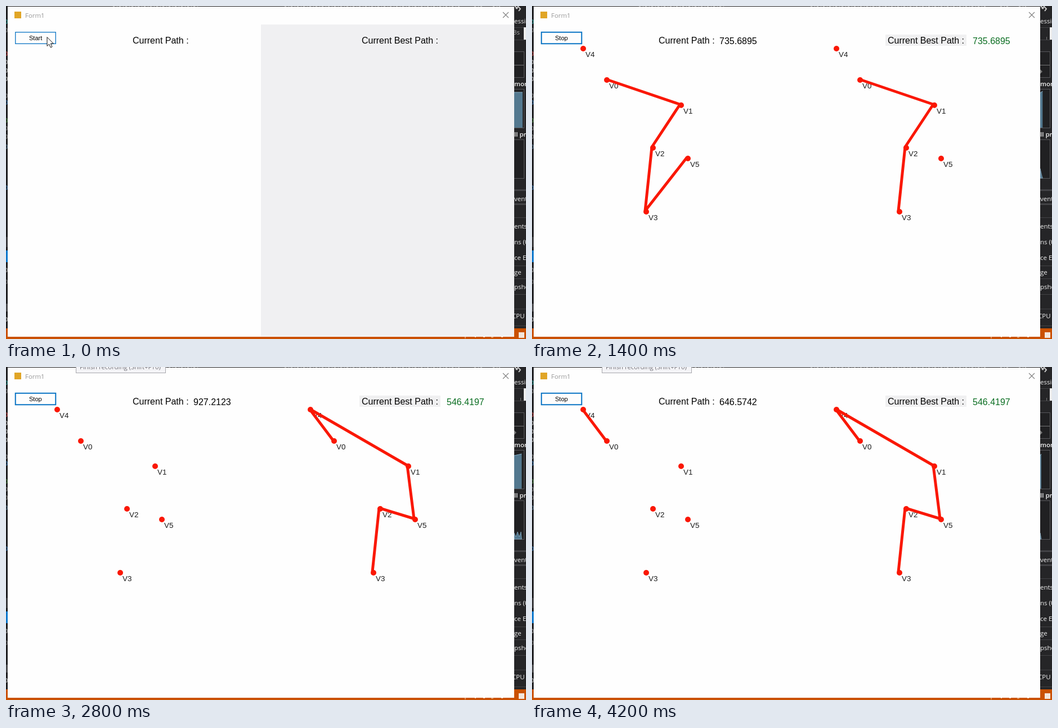
An HTML page that plays this animation: 924 by 594 pixels, repeating every 4400 ms.

```html
<!DOCTYPE html>
<html lang="en">
<head>
<meta charset="utf-8">
<title>Path search</title>
<style>
html, body { margin: 0; width: 100%; height: 100%; overflow: hidden; background: #1f1f21; }
svg { display: block; width: 924px; height: 594px; }
text { white-space: pre; }
.ui { font-family: "Liberation Sans", Arial, sans-serif; }
.side { font-family: "Open Sans", "Noto Sans", sans-serif; font-size: 11.5px; fill: #f1f1f1; }
</style>
</head>
<body>
<svg viewBox="0 0 924 594">
  <rect width="924" height="594" fill="#1f1f21"/>
  <g id="code"></g>
  <g id="side"></g>
  <g id="graphs"></g>
  <path d="M0 575H3V590H903V575H924V594H0Z" fill="#ca5100"/>
  <path d="M816 590v3M833 590.500h2M848 590.500h3M862 591h4M880 590.500h3" stroke="#f5d9c4"/>
  <rect x="911" y="582" width="10" height="10" fill="#f4e6dc"/>

  <rect x="3" y="1" width="900" height="589" fill="#fefefe"/>
  <rect id="panel" x="453" y="33" width="450" height="556" fill="#f0f0f2"/>
  <rect x="15" y="10" width="12" height="12" fill="#e0a526"/>
  <text x="34" y="21" class="side" style="font-size:11.4px;fill:#999">Form1</text>
  <path d="M883 11L893 21M893 11L883 21" stroke="#808080" stroke-width="1.1"/>

  <g id="tip">
    <rect x="124.500" y="-8" width="159" height="18.500" fill="#f4f4f7" stroke="#a6a6ac"/>
    <text x="131" y="4" class="side" style="font-size:11.4px;fill:#707078">Finish recording (Shift+F10)</text>
  </g>

  <g class="ui" font-size="16">
    <rect id="button" x="16.750" y="46.750" width="71.500" height="20.500" fill="#fdfdfd" stroke="#0873c4"/>
    <text id="caption" x="41" y="61" font-size="11"></text>
    <g id="left"></g>
    <g id="right"></g>
    <text x="225" y="67">Current Path :</text>
    <text id="now" x="333" y="68"></text>
    <rect id="plate" x="628" y="51" width="144" height="20" fill="#f0f0f1"/>
    <text x="632" y="67">Current Best Path :</text>
    <text id="best" x="783" y="68" fill="#0b6e22"></text>
  </g>
  <path id="cursor" d="M73 55.500V71.500L76.600 68L79.300 74L82 72.800L79.400 67H84.300Z" fill="#fff" stroke="#111"/>
</svg>
<script>
const STEP = 200, LOOP = 4400;
const $ = id => document.getElementById(id);
const nodes = [[133, 132], [265, 177], [215, 253], [203, 367], [91, 76], [277, 272]];

// Each row: current path, its drawing progress, best path, its drawing progress.
// Progress 0-6 counts dots, 7-11 adds edges; a half step has a dot without label.
const plan = [
  ["", 0, "", 0],
  ["", 0, "", 0],
  ["", 0, "", 0],
  ["", 0, "", 0],
  ["021453", 2, "", 0],
  ["021453", 11, "021453", 8],
  ["021354", 6, "021453", 11],
  ["012354", 10, "012354", 9],
  ["041253", 11, "041253", 8],
  ["", 0, "041253", 11],
  ["035214", 8, "041253", 11],
  ["041523", 11, "041523", 11],
  ["015423", 5, "041523", 11],
  ["052314", 9, "041523", 11],
  ["031425", 6, "041523", 11],
  ["024153", 11, "041523", 11],
  ["041253", 0.5, "041523", 11],
  ["053124", 8, "041523", 11],
  ["014235", 4, "041523", 11],
  ["032541", 10, "041523", 11],
  ["025134", 6, "041523", 11],
  ["042513", 7, "041523", 11]
];

function pathLength(path) {
  if (!path) return "";
  let sum = 0;
  for (let i = 1; i < path.length; i++) {
    const a = nodes[path[i - 1]], b = nodes[path[i]];
    sum += Math.hypot(a[0] - b[0], a[1] - b[1]);
  }
  return sum.toFixed(4);
}

function graph(path, progress, dx) {
  let dots = "", labels = "";
  nodes.forEach(([x, y], i) => {
    if (progress > i) dots += `<circle cx="${x + dx}" cy="${y}" r="5"/>`;
    if (progress >= i + 1) labels += `<text x="${x + dx + 4}" y="${y + 15}">V${i}</text>`;
  });
  const points = [...path].slice(0, Math.max(0, progress - 5))
    .map(i => `${nodes[i][0] + dx - 2},${nodes[i][1] - 1.5}`).join(" ");
  return `<g font-size="13.4" fill="#1a1a1a">${labels}</g>` +
    `<polyline points="${points}" fill="none" stroke="#fa1703" stroke-width="5" stroke-linejoin="bevel"/>` +
    `<g fill="#fa1703">${dots}</g>`;
}

function memory(k) {
  if (k < 2) return 15;
  if (k < 6) return 0;
  if (k > 19) return 2;
  return Math.min(17, 3 + (k - 6) * 1.3);
}

function drawGraphs(k) {
  const w = memory(k), x = 903;
  const top = k < 2 ? 154 : k < 14 ? 155 : 158;
  let out = "";
  if (w) {
    out += `<path d="M${x} 217V${top}L${x + w} ${k < 2 ? 154 : top - 3}V217Z" fill="#53788f"/>`;
    out += `<path d="M${x} ${top}L${x + w} ${k < 2 ? 154 : top - 3}" stroke="#8db4ca"/>`;
  }
  if (k >= 6 && w) {
    let d = `M${x} 307V${k < 12 ? 290 : 296}`;
    for (let i = 3; i < w; i += 3) d += `L${x + i} ${i % 2 ? 303 : 294}`;
    out += `<path d="${d}L${x + w} 307Z" fill="#53788f" stroke="#8db4ca" stroke-width=".7"/>`;
  }
  if (k < 2) out += `<text x="901" y="51" class="side" style="fill:#aaa">3s</text>`;
  else out += `<path d="M914.500 55v5" stroke="#777"/>`;
  if (k >= 5) out += `<path d="M903 113L907 117L903 121Z" fill="#777"/>`;
  $("graphs").innerHTML = out;
}

function buildSurroundings() {
  const words = [["ession", 31], ["mory", 143, 1], ["ll pr", 233, 1], ["vents", 348], ["ents", 397],
    ["ns (0", 425], ["ce E", 453], ["ge", 479], ["pshot", 505], ["CPU", 557]];
  let out = '<rect x="903" width="21" height="575" fill="#252527"/>';
  for (const y of [38, 60, 377, 463, 486, 514, 540, 570]) out += `<path d="M903 ${y}.500H924" stroke="#434346"/>`;
  out += '<path d="M903 328.500H924M903 353.500H924" stroke="#434346" stroke-width="3"/>';
  for (const [y, h] of [[81, 46], [148, 69], [238, 69]])
    out += `<rect x="895" y="${y}.500" width="25.500" height="${h}" fill="#202022" stroke="#58585c"/>`;
  out += '<path d="M903 105.500H920" stroke="#777"/><rect x="920" y="38" width="4" height="22" fill="#eee"/>';
  out += '<path d="M904 0L909 5M906 5L910 1L914 5L911 9" fill="none" stroke="#ccc" stroke-width="2"/>';
  for (const [s, y, bold] of words)
    out += `<text x="${s === "CPU" ? 899 : 903}" y="${y}" class="side" font-weight="${bold ? 600 : 400}">${s}</text>`;
  $("side").innerHTML = out;

  const marks = [[28, "#2aa6a0"], [43, "#888"], [85, "#d04a4a"], [100, "#ccc"], [115, "#ccc"], [130, "#ccc"],
    [160, "#888"], [172, "#3d7fbd"], [204, "#4f8a45"], [218, "#888"], [233, "#888"], [251, "#5a7d99"],
    [324, "#3d7fbd"], [471, "#aaa"], [492, "#777"], [559, "#ccc"]];
  out = marks.map(([y, c]) => `<path d="M0 ${y - 3}h2v6h-2" fill="none" stroke="${c}"/>`).join("");
  out += '<rect y="412" width="3" height="18" fill="#3a3a3d"/><rect y="436" width="3" height="21" fill="#0a78cc"/>';
  out += '<rect y="531" width="3" height="14" fill="#4a4a4d"/>';
  out += '<path d="M190 .500H342M495 .500H806M832 .500H846M865 .500H878" stroke="#777" stroke-dasharray="3 4 1 3"/>';
  $("code").innerHTML = out;
}

const show = (id, on) => $(id).setAttribute("visibility", on ? "visible" : "hidden");

let last = -1;
function render(time) {
  const k = Math.floor((time % LOOP) / STEP);
  if (k !== last) {
    last = k;
    const [path, progress, best, bestProgress] = plan[k];
    $("left").innerHTML = graph(path, progress, 0);
    $("right").innerHTML = graph(best, bestProgress, 450);
    $("now").textContent = pathLength(path);
    $("best").textContent = pathLength(best);
    $("caption").textContent = k < 2 ? "Start" : "Stop";
    $("button").setAttribute("stroke-width", k < 4 ? 1.3 : 2);
    show("cursor", k < 4);
    show("panel", k < 3);
    show("plate", k >= 3);
    show("tip", k >= 9);
    $("tip").setAttribute("opacity", k === 9 ? 0.65 : 1);
    drawGraphs(k);
  }
}

function tick(now) {
  render(now);
  requestAnimationFrame(tick);
}
buildSurroundings();
render(0);
requestAnimationFrame(tick);
</script>
</body>
</html>
```
